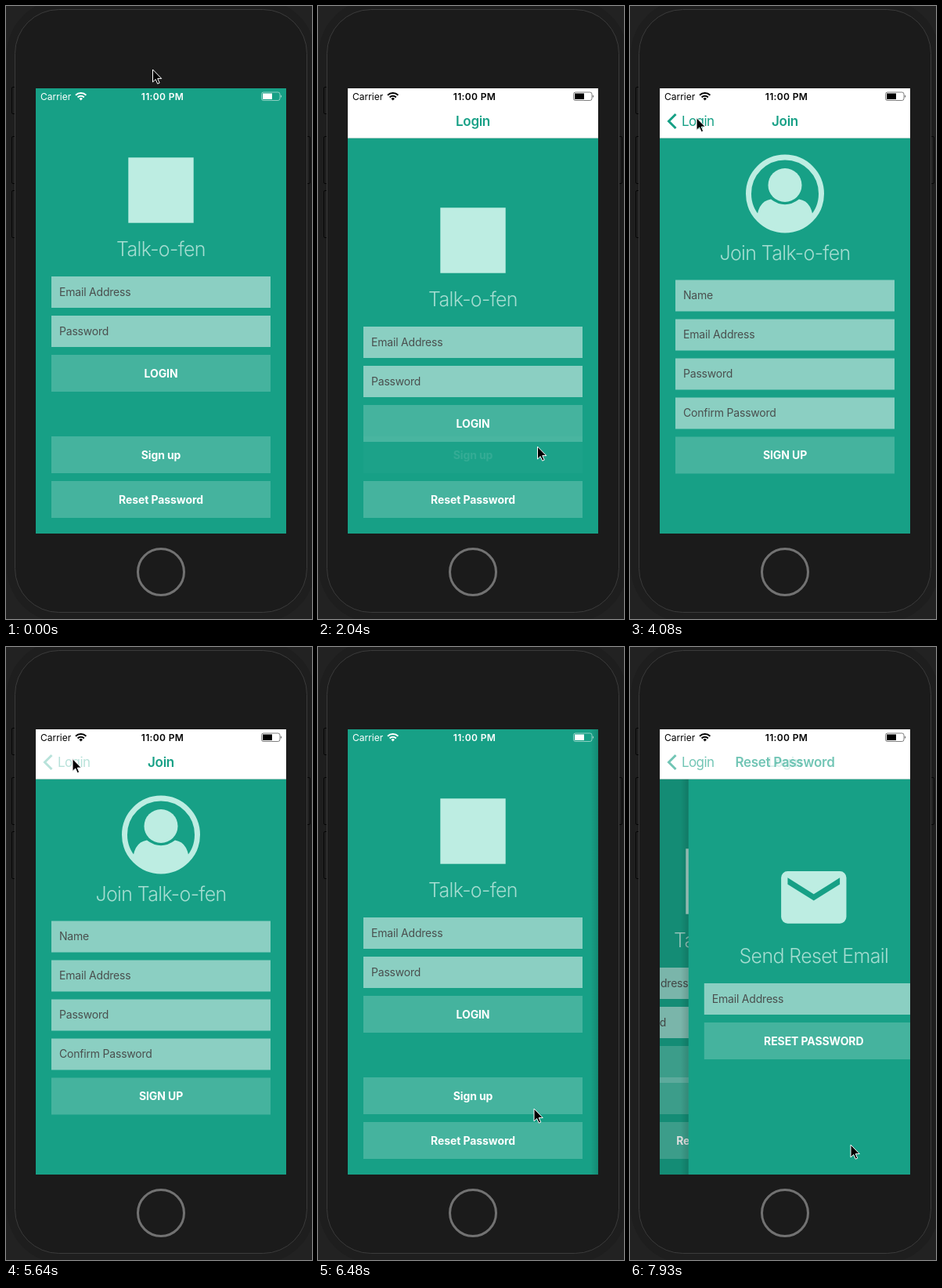
These frames come from a looping animation (391x782 px, 7990 ms). An HTML page:

```html
<!DOCTYPE html>
<html lang="en">
<head>
<meta charset="utf-8">
<title>Phone login flow</title>
<style>
html, body { margin: 0; width: 100%; height: 100%; overflow: hidden; background: #222; }
svg { display: block; }
text { font-family: Inter, Roboto, sans-serif; }
.mid { text-anchor: middle; }
.heading { font-size: 25px; font-weight: 300; letter-spacing: -.65px; fill: #a5ddd1; }
.label { font-size: 14px; letter-spacing: -.2px; fill: #4a4f4e; }
.button { font-size: 14px; font-weight: 700; letter-spacing: -.1px; fill: #fff; }
.title { font-size: 17px; font-weight: 600; letter-spacing: -.3px; fill: #17a086; }
.back { font-size: 17px; letter-spacing: -.6px; fill: #17a086; }
.small { font-size: 12px; }
.icon { fill: #bdede2; }
</style>
</head>
<body>
<svg width="391" height="782" viewBox="0 0 391 782">
  <defs>
    <clipPath id="screen"><path d="M38 105h320v568H38z"/></clipPath>
    <clipPath id="disc"><circle cx="198" cy="240" r="47"/></clipPath>
    <linearGradient id="shade">
      <stop stop-color="#000" stop-opacity="0"/>
      <stop offset="1" stop-color="#000" stop-opacity=".14"/>
    </linearGradient>
  </defs>

  <rect width="391" height="782" fill="#222"/>
  <rect x="1" y="-8" width="394" height="794" rx="70" fill="#1e1e1e"/>
  <g fill="#1f1f1f" stroke="#060606">
    <rect x="7.5" y="103.500" width="7" height="34" rx="1.500"/>
    <rect x="7.5" y="166.500" width="7" height="60" rx="1.500"/>
    <rect x="7.5" y="235.500" width="7" height="60" rx="1.500"/>
    <rect x="381.5" y="166.500" width="7" height="60" rx="1.500"/>
  </g>
  <rect x="11.5" y="4.500" width="373" height="769" rx="56" fill="#1b1b1b" stroke="#3b3b3b"/>
  <circle cx="198" cy="722" r="29.500" fill="none" stroke="#727272" stroke-width="3"/>

  <g clip-path="url(#screen)">
    <g id="login"></g>
    <rect id="dim" x="38" y="105" width="320" height="568"/>
    <g id="join"></g>
    <g id="reset"></g>
    <g id="header">
      <path d="M38 105h320v63.500H38z" fill="#fff"/>
      <path d="M38 168.500h320" stroke="#b5c9c5" stroke-width=".6"/>
      <text id="loginTitle" class="title mid" x="198" y="152.500">Login</text>
      <text id="joinTitle" class="title mid" x="198" y="152.500">Join</text>
      <text id="resetTitle" class="title mid" x="198" y="152.500">Reset Password</text>
      <g id="back">
        <path d="M58.500 138l-9 9 9 9" fill="none" stroke="#17a086" stroke-width="3"/>
        <text class="back" x="66" y="153">Login</text>
      </g>
    </g>
    <g id="status">
      <text class="small" x="44" y="119.500">Carrier</text>
      <g fill="none" stroke="currentColor" stroke-width="2">
        <path d="M89 113.800a9.500 9.500 0 0 1 13.400 0M91.600 116.500a5.800 5.800 0 0 1 8.200 0"/>
      </g>
      <path d="M95.700 120.500l-2.200-2.300a3.100 3.100 0 0 1 4.400 0z"/>
      <text class="small mid" x="200" y="119.500" font-weight="600" letter-spacing=".35">11:00 PM</text>
      <rect x="326.500" y="110" width="23.500" height="10.500" rx="2.500" fill="none" stroke="currentColor" stroke-opacity=".5"/>
      <path d="M328 111.500h12v7.500h-12z"/>
      <path d="M351 113.500q2.500 1.700 0 3.500z" opacity=".6"/>
    </g>
  </g>
  <path id="cursor" d="M0 0V16l3.700-3.500 2.500 5.700 2.500-1.100-2.500-5.500h5.100z" fill="#000" stroke="#fff"/>
</svg>

<script>
const $ = id => document.getElementById(id);
const backdrop = '<path d="M38 105h320v568H38z" fill="#17a086"/>';
const shadow = '<path d="M28 105h10v568H28z" fill="url(#shade)"/>';
const box = (y, h, alpha) => `<rect x="58" y="${y}" width="280" height="${h}" fill="#fff" fill-opacity="${alpha}"/>`;
const field = (y, label) => box(y, 40, .5) + `<text class="label" x="68" y="${y + 24.5}">${label}</text>`;
const button = (y, label, id = '') =>
  `<g id="${id}">${box(y, 47, .2)}<text class="button mid" x="198" y="${y + 28.5}">${label}</text></g>`;
const heading = (y, label) => `<text class="heading mid" x="198" y="${y}">${label}</text>`;

$('login').innerHTML = backdrop + '<g id="loginForm">' +
  '<rect class="icon" x="156.300" y="193.300" width="83.400" height="83.400"/>' +
  heading(319, 'Talk-o-fen') + field(345, 'Email Address') + field(395, 'Password') +
  button(445, 'LOGIN') + '</g>' +
  button(549, 'Sign up', 'signUp') + button(606, 'Reset Password', 'resetButton');

$('join').innerHTML = shadow + backdrop + '<g id="joinForm">' +
  '<circle cx="198" cy="239.500" r="46.500" fill="none" stroke="#bdede2" stroke-width="7"/>' +
  '<circle class="icon" cx="198" cy="228.500" r="21.500"/>' +
  '<path class="icon" clip-path="url(#disc)" d="M162 290V271Q164 249 180 246.500Q198 260 216 246.500Q232 249 234 271V290z"/>' +
  heading(323.5, 'Join Talk-o-fen') +
  ['Name', 'Email Address', 'Password', 'Confirm Password'].map((s, i) => field(349.5 + 50 * i, s)).join('') +
  button(549.5, 'SIGN UP') + '</g>';

$('reset').innerHTML = shadow + backdrop +
  '<path class="icon" transform="translate(148 269.300) scale(4.167)" d="M20 4H4a2 2 0 0 0-2 2v12a2 2 0 0 0 2 2h16a2 2 0 0 0 2-2V6a2 2 0 0 0-2-2zm0 4l-8 5-8-5V6l8 5 8-5z"/>' +
  heading(403, 'Send Reset Email') + field(429, 'Email Address') + button(479, 'RESET PASSWORD');

const LOOP = 7990;
const PUSH_JOIN = 2060, POP = 5740, PUSH_RESET = 7720;

// Pointer stops: time, x, y
const stops = [
  [0, 187.5, 81], [240, 187.5, 81], [1010, 227, 487], [1070, 227, 487], [1820, 280.5, 562],
  [2720, 280.5, 562], [2960, 152, 470], [3240, 358, 320], [3460, 250, 194], [3520, 245, 191],
  [4080, 85, 142.5], [5940, 85, 142.5], [6430, 276, 589], [6480, 276, 589], [6710, 282, 635], [LOOP, 282, 635]
];

const clamp = v => Math.max(0, Math.min(1, v));
const spring = ms => ms <= 0 ? 0 : 1 - (1 + .0176 * ms) * Math.exp(-.0176 * ms);
const fade = (t, start) => clamp((t - start) / 350);
const press = (t, down, up) => t < down ? 1 : .12 + .88 * clamp((t - up) / 150);
const move = (id, x, y = 0) => $(id).setAttribute('transform', `translate(${x} ${y})`);
const alpha = (id, v) => $(id).setAttribute('opacity', v);

function pointer(t) {
  const i = stops.findIndex(s => s[0] > t);
  const [t0, x0, y0] = stops[i - 1], [t1, x1, y1] = stops[i];
  const k = (t - t0) / (t1 - t0), e = k * k * (3 - 2 * k);
  return [x0 + (x1 - x0) * e, y0 + (y1 - y0) * e];
}

function draw(t) {
  const joined = t < POP ? spring(t - PUSH_JOIN) : 1 - spring(t - POP);
  const resetting = spring(t - PUSH_RESET);
  const covered = Math.max(joined, resetting);
  const header = t >= 1980 && t < POP || t >= 7700;
  const darkStatus = t >= 1980 && t < 6300 || t >= 7700;

  move('login', -96 * covered);
  move('loginForm', 0, header ? 64 : 0);
  alpha('dim', .14 * covered);
  move('join', joined > 0 ? 320 * (1 - joined) : 340);
  move('joinForm', 0, t < POP ? 0 : -64);
  move('reset', resetting > 0 ? 320 * (1 - resetting) : 340);

  alpha('signUp', press(t, 1870, 2070));
  alpha('resetButton', press(t, 7660, 7740));

  const joinFade = t < POP ? fade(t, PUSH_JOIN) : 0;
  const resetFade = fade(t, PUSH_RESET);
  alpha('header', header ? 1 : 0);
  alpha('loginTitle', (1 - Math.max(joinFade, resetFade)) ** 2);
  alpha('joinTitle', joinFade);
  alpha('resetTitle', resetFade);
  alpha('back', Math.max(joinFade, resetFade) * (t >= 5640 && t < POP ? .3 : 1));

  const ink = darkStatus ? '#000' : '#fff';
  $('status').setAttribute('fill', ink);
  $('status').setAttribute('color', ink);
  move('cursor', ...pointer(t));
}

const begin = performance.now();
function tick() {
  draw((performance.now() - begin) % LOOP);
  requestAnimationFrame(tick);
}
tick();
</script>
</body>
</html>
```
